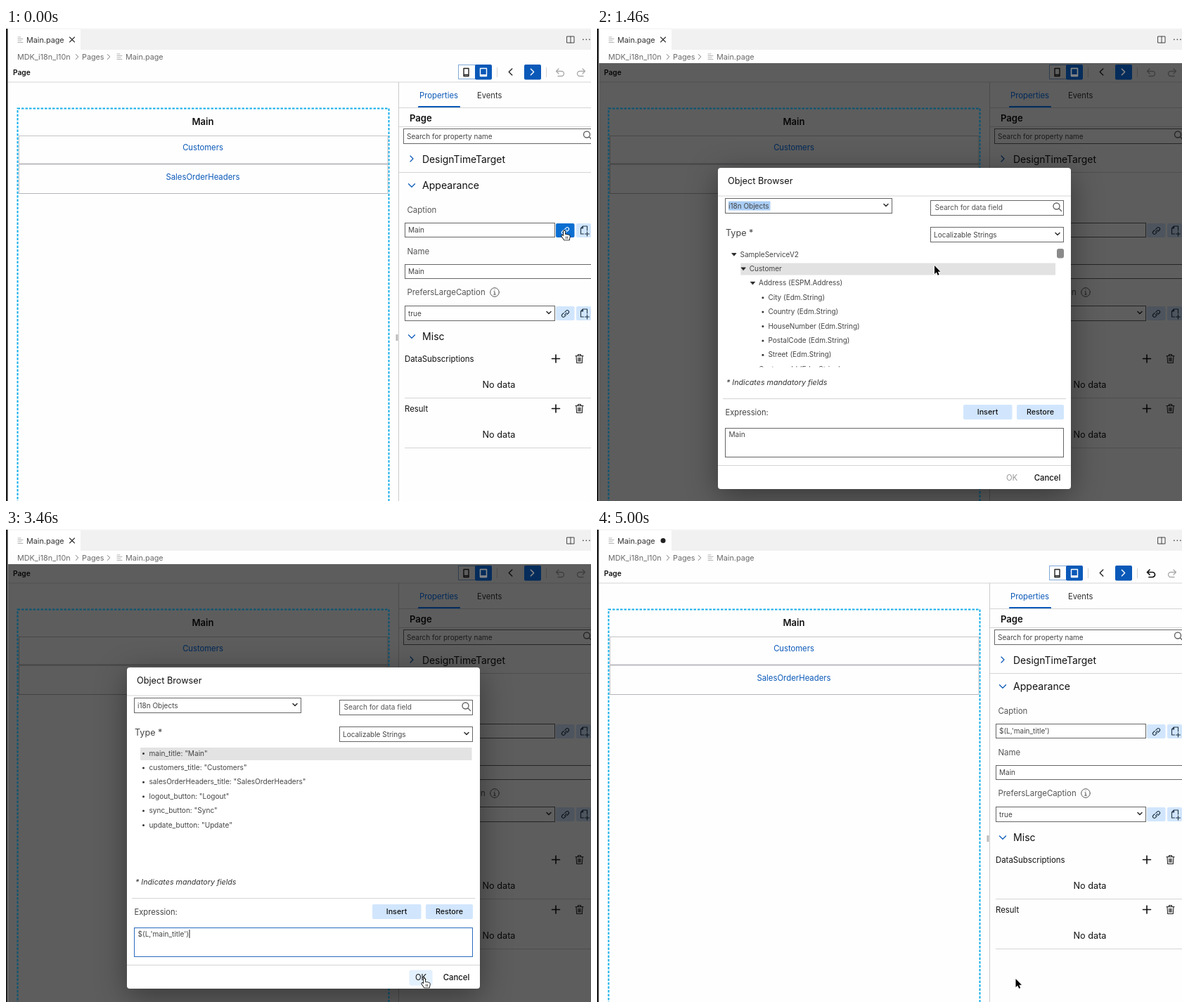
An HTML page with a canvas for the animation above (5.1 s loop, 832 by 673 pixels).

```html
<!DOCTYPE html>
<html lang="en">
<head>
<meta charset="utf-8">
<title>Object Browser</title>
<style>
  html, body { margin: 0; width: 100%; height: 100%; overflow: hidden; background: #fff; }
  canvas { display: block; width: 100%; height: 100%; }
</style>
</head>
<body>
<canvas id="stage" width="832" height="673"></canvas>
<script>
const ctx = document.getElementById('stage').getContext('2d');
const LOOP = 5100;
const BLUE = '#0a59b8', HOVER = '#0a6ed1', PALE = '#d1e6fd', INK = '#111', GREY = '#555', LINE = '#d5d5d5';
const EXPRESSION = "$(L,'main_title')";

// When each state begins, in ms
const T = { open: 200, i18n: 1130, strings: 1730, select: 2370, insert: 2740,
            overOk: 3460, press: 4000, close: 4330, done: 4600 };

// Pointer path: time, x, y
const PATH = [[0, 793, 288], [130, 793, 288], [460, 338, 228], [600, 300, 254], [850, 300, 254],
  [1060, 270, 274], [1130, 275, 274], [1460, 480, 338], [1730, 480, 340], [2230, 270, 318],
  [2740, 270, 318], [2860, 408, 431], [3000, 408, 431], [3460, 594, 639], [4500, 594, 639], [4600, 595.5, 640]];

const TREE = [[0, 'SampleServiceV2'], [1, 'Customer'], [2, 'Address (ESPM.Address)'],
  ...['City', 'Country', 'HouseNumber', 'PostalCode', 'Street'].map(n => [3, n + ' (Edm.String)']),
  [2, 'CustomerId (Edm.String)']];
const STRINGS = ['main_title: "Main"', 'customers_title: "Customers"',
  'salesOrderHeaders_title: "SalesOrderHeaders"', 'logout_button: "Logout"',
  'sync_button: "Sync"', 'update_button: "Update"'];

function text(s, x, cy, size, color = INK, style = '', align = 'left') {
  ctx.font = `${style} ${size}px Inter, "Liberation Sans", sans-serif`;
  ctx.textAlign = align;
  ctx.fillStyle = color;
  ctx.fillText(s, x, cy + size * 0.36);
}
function fill(x, y, w, h, color, radius = 0) {
  ctx.fillStyle = color;
  ctx.beginPath();
  ctx.roundRect(x, y, w, h, radius);
  ctx.fill();
}
function box(x1, y1, x2, y2, color = '#666', width = 1) {
  ctx.strokeStyle = color;
  ctx.lineWidth = width;
  ctx.strokeRect(x1 + 0.5, y1 + 0.5, x2 - x1 - 1, y2 - y1 - 1);
}
// Strokes (and optionally fills) an SVG path moved to x, y
function icon(d, x, y, color, width = 1.2, inside) {
  const path = new Path2D(d);
  ctx.save();
  ctx.translate(x, y);
  ctx.lineJoin = ctx.lineCap = 'round';
  ctx.strokeStyle = color;
  ctx.lineWidth = width;
  ctx.stroke(path);
  if (inside) { ctx.fillStyle = inside; ctx.fill(path); }
  ctx.restore();
}
const chevronRight = (x, y, color, s = 4, w) => icon(`M${-s / 2} ${-s}L${s / 2} 0L${-s / 2} ${s}`, x, y, color, w);
const chevronDown = (x, y, color, s = 4, w) => icon(`M${-s} ${-s / 2}L0 ${s / 2}L${s} ${-s / 2}`, x, y, color, w);
const magnifier = (x, y) => icon('M4.5 0a4.5 4.5 0 1 1-9 0a4.5 4.5 0 1 1 9 0M3.3 3.3L7 7', x, y, '#666', 1.4);
const fileLines = (x, y) => icon('M0-3.5H4M0-1H7M0 1.5H5M0 4H7', x, y, '#aaa', 0.9);

function field(x1, y1, x2, y2, value, select) {
  fill(x1, y1, x2 - x1, y2 - y1, '#fff');
  box(x1, y1, x2, y2);
  text(value, x1 + 5, (y1 + y2) / 2, 10, '#444');
  if (select) chevronDown(x2 - 9, (y1 + y2) / 2 - 1, '#333', 3, 1.6);
}
function bindButtons(y, hovered) {
  fill(782, y, 26.5, 20, hovered ? HOVER : PALE, 2);
  fill(811, y, 21, 20, PALE, 2);
  const ink = hovered ? '#fff' : '#223548';
  icon('M-1 1.6L1.8-1.2M-.8-2.2L1.2-4.2a2.2 2.2 0 0 1 3.2 3.2L2.4 1M.8 2.2L-1.2 4.2a2.2 2.2 0 0 1-3.2-3.2L-2.4-1', 795.5, y + 10.5, ink, 1.1);
  icon('M-1 5H-5V-3L-2-6H4V0M-5-3H-2V-6M4 2V8M1 5H7', 822.5, y + 10, '#223548', 1.1);
}

function editorBar(t) {
  fill(0, 0, 832, 31, '#f1f1f1');
  fill(0, 0, 832, 1.5, '#fafafa');
  fill(3, 2, 103, 30, '#fff');
  if (t >= T.open && t < T.done) fill(3, 31, 829, 19, '#fefefe');
  fileLines(17, 16.5);
  text('Main.page', 29, 17, 10.8, '#333');
  if (t >= T.done) fill(90.5, 13, 7, 7, '#222', 4);
  else icon('M-3.5-3.5L3.5 3.5M3.5-3.5L-3.5 3.5', 94, 16.5, '#333', 1.1);
  icon('M0 0H10V9H0ZM5 0V9', 798, 12, '#444', 1);
  for (const x of [820, 824.5, 829]) fill(x, 15.5, 1.7, 1.7, '#444', 1);
  text('MDK_i18n_l10n', 16, 41, 10.8, '#6a6a6a');
  chevronRight(101, 41, '#777', 3.5, 1);
  text('Pages', 108, 41, 10.8, '#6a6a6a');
  chevronRight(146, 41, '#777', 3.5, 1);
  fileLines(158, 40.5);
  text('Main.page', 170, 41, 10.8, '#6a6a6a');
}

// Blue parts of the page; they stay a little stronger than the rest under the shade
function accents() {
  ctx.setLineDash([3.5, 2]);
  box(16, 114, 545, 690, '#14aeea', 2);
  ctx.setLineDash([]);
  text('Customers', 280, 170, 11.25, BLUE, '', 'center');
  text('SalesOrderHeaders', 280, 211.5, 11.35, BLUE, '', 'center');
  fill(667, 52, 24, 21.5, BLUE, 2);
  fill(737, 52, 24, 21.5, BLUE, 2);
  text('Properties', 588, 96, 11.3, BLUE);
  fill(586, 111, 60, 3, BLUE, 1);
}
function accentIcons(color) {
  icon('M-4.5-5.5H4.5V5.5H-4.5ZM-4.5 3.8H4.5', 679, 63, color, 1.4);
  chevronRight(748.5, 62.5, color, 4.3, 1.3);
}

function page(t) {
  text('Page', 10, 63, 10.2, INK, '600');
  box(643, 52, 690, 73, '#7fa9d8');
  accents();
  accentIcons('#fff');
  icon('M-3.5-5.5H3.5V5.5H-3.5ZM-3.5 3.5H3.5', 654.5, 63, '#222', 1.4);
  fill(698, 56, 1, 14, LINE);
  fill(768, 56, 1, 14, LINE);
  icon('M2.3-4.5L-2.3 0L2.3 4.5', 717.5, 62.5, '#222', 1.3);
  const back = t >= T.done ? '#111' : '#aaa';
  icon('M-2-6L-5.5-2.5L-2 1M-5.5-2.5H2a3.5 3.5 0 0 1 0 7H-3', 788, 64, back, t >= T.done ? 1.7 : 1.3);
  icon('M2-6L5.5-2.5L2 1M5.5-2.5H-2a3.5 3.5 0 0 0 0 7H3', 818, 64, '#aaa', 1.3);
  fill(3, 76.5, 829, 1, LINE);
  fill(558, 77, 1, 596, '#ccc');
  fill(554.5, 436, 3, 9, '#bbb');

  text('Main', 280, 133, 13.1, INK, '600', 'center');
  fill(18, 153, 525, 1, '#c4c4c8');
  fill(18, 192.5, 525, 2, '#bcbcc2');
  fill(18, 235, 525, 1, '#b4b4ba');
  for (const x of [18, 542.5]) fill(x, 153, 1, 82, '#c4c4c8');

  text('Events', 670, 96, 11.2, '#333');
  fill(559, 113, 273, 1, LINE);
  text('Page', 574, 128, 13.1, INK, '600');
  fill(559, 140, 273, 1, LINE);
  field(565, 143, 840, 165, 'Search for property name');
  magnifier(826, 151.5);
  chevronRight(577, 186, BLUE, 4);
  text('DesignTimeTarget', 592, 186.5, 13.9);
  fill(559, 205, 273, 1, LINE);
  chevronDown(577, 224, BLUE, 4.5);
  text('Appearance', 592, 224, 14.1);
  text('Caption', 570.5, 259, 11.4, GREY);
  field(567, 277, 781, 298, t >= T.close ? EXPRESSION : 'Main');
  bindButtons(278, t < 130);
  text('Name', 570.5, 317.5, 11.4, GREY);
  field(567, 336, 840, 357, 'Main');
  text('PrefersLargeCaption', 570.5, 376, 11.4, GREY);
  icon('M6.3 0a6.3 6.3 0 1 1-12.6 0a6.3 6.3 0 1 1 12.6 0M-1-1H0V3M-1.3 3H1.3M0-3.3V-3.2', 695, 376, '#555', 1);
  field(567, 395, 781, 417, 'true', true);
  bindButtons(396, false);
  chevronDown(577, 439, BLUE, 4.5);
  text('Misc', 592, 439, 14.1);
  for (const [label, y, rule] of [['DataSubscriptions', 470.5, 526], ['Result', 541.5, 597]]) {
    text(label, 567, y, 11.4);
    icon('M-5.5 0H5.5M0-5.5V5.5', 782, y, '#111', 1.6);
    icon('M-5.5-4H5.5M-2-4V-6H2V-4M-4.5-4L-3.8 6H3.8L4.5-4M-1.7-1.5V3.7M0-1.5V3.7M1.7-1.5V3.7', 815.5, y, '#222', 1.1);
    text('No data', 701, y + 36.5, 12.7, INK, '', 'center');
    fill(567, rule, 265, 1, LINE);
  }
}

function treeRows(top, first, clipBottom, pointer) {
  ctx.save();
  ctx.beginPath();
  ctx.rect(180, top + first - 10, 474, clipBottom - first + 10);
  ctx.clip();
  TREE.forEach(([level, label], i) => {
    const y = top + first + i * 20.4, x = 203.5 + level * 13.3;
    if (level < 3 && pointer.x > x - 13 && pointer.x < 652 && Math.abs(pointer.y - y) < 9)
      fill(x - 12.5, y - 8, 664.5 - x, 17, '#e2e2e2');
    if (level === 3) fill(x - 9, y - 1, 3, 3, '#333', 2);
    else if (i < 3) icon('M-3-1.5H3L0 2Z', x - 8.5, y, '#222', 0.8, '#222');
    text(label, x, y, 10, '#444');
  });
  ctx.restore();
  fill(654, top + first - 8, 10, 13.5, '#8a8a8a', 3);
}

function stringRows(top, t, pointer) {
  STRINGS.forEach((label, i) => {
    const y = top + 122 + i * 20.4;
    const hovered = t < T.insert && pointer.x > 191 && pointer.x < 662 && Math.abs(pointer.y - y) < 9;
    const chosen = i === 0 && t >= T.select;
    if (hovered || chosen) fill(191, y - 8, 471.5, 18, t >= T.press ? '#f5f5f5' : '#e3e3e3');
    fill(194, y - 1, 3, 3, '#333', 2);
    text(label, 203.5, y, 10.1, '#444');
  });
}

function dialog(t, pointer) {
  const i18n = t >= T.i18n, strings = t >= T.strings, inserted = t >= T.insert;
  const top = strings ? 197 : 199, low = top + (i18n ? 4 : 0);
  ctx.save();
  ctx.shadowColor = 'rgba(0,0,0,.4)';
  ctx.shadowBlur = 44;
  ctx.shadowOffsetY = 10;
  fill(172, top, 502, i18n ? 457 : 453, '#fff', 4);
  ctx.restore();
  text('Object Browser', 186, top + 18.7, 12.7);
  fill(172, top + 39.5, 502, 1, LINE);

  field(182, top + 43, 420, top + 65, i18n ? 'i18n Objects' : 'OData Objects', true);
  if (i18n && !strings) {
    fill(187, top + 47.5, 59.5, 13, '#a9cdf5');
    text('i18n Objects', 187, top + 54, 10, '#444');
  }
  field(474, top + 46, 664, top + 68, '');
  text('Search for data field', 480.5, top + 56.7, 10.05, '#555');
  magnifier(653.5, top + 54.5);

  if (i18n) {
    text('Type *', 183, top + 92.3, 12.6, '#444');
    field(474, top + 84, 664, top + 106, 'Localizable Strings', true);
    text('* Indicates mandatory fields', 184, top + 305.5, 10.7, '#333', 'italic');
  } else {
    text('Format:', 182.5, top + 267, 12.4, '#444');
    field(242, top + 255, 358, top + 277, 'Binding', true);
    text('Double-click tree node to add it.', 183, top + 301.5, 10.7, '#333', 'italic');
  }
  if (strings) stringRows(top, t, pointer);
  else treeRows(top, i18n ? 123 : 81, i18n ? 283.5 : 241.5, pointer);

  fill(179, low + 324, 488, 1, LINE);
  text('Expression:', 182.5, low + 344, 11.2, '#444');
  fill(521, low + 333, 69.5, 21, PALE, 2);
  fill(597, low + 333, 67, 21, PALE, 2);
  text('Insert', 555.5, low + 343.5, 10.8, INK, '500', 'center');
  text('Restore', 630.5, low + 343.5, 10.7, INK, '500', 'center');

  const focused = inserted && t < T.press;
  box(182, low + 366, 664, low + 408, focused ? '#2a6bbf' : '#666');
  text(inserted ? EXPRESSION : 'Main', 187.5, low + 375, 10.1, '#444');
  if (focused) fill(188 + ctx.measureText(EXPRESSION).width, low + 369, 1, 12, '#222');

  fill(172, low + 419, 502, 1, LINE);
  const over = t >= T.overOk, pressed = t >= T.press;
  if (over) fill(573.5, low + 426.5, 33, 22, pressed ? HOVER : '#e3f0fd', 2);
  if (pressed) box(575, low + 428, 605, low + 447, '#cfe4fa');
  text('OK', 590, low + 437, 11.3, pressed ? '#fff' : inserted ? INK : '#999', '', 'center');
  text('Cancel', 640.5, low + 437, 11.3, INK, '500', 'center');
}

function pointerAt(t) {
  const i = PATH.findIndex(p => p[0] > t);
  if (i < 0) { const [, x, y] = PATH[PATH.length - 1]; return { x, y }; }
  const [t0, x0, y0] = PATH[i - 1], [t1, x1, y1] = PATH[i];
  const u = (t - t0) / (t1 - t0), k = u * u * (3 - 2 * u);
  return { x: x0 + (x1 - x0) * k, y: y0 + (y1 - y0) * k };
}
function drawPointer({ x, y }, hand) {
  if (hand) {
    icon('M0 1c0-1.5 2-1.5 2 0v4l5 1c1.5.4 2 1 1.8 2.5l-.8 4.5H1l-3.5-5c-.8-1.3.5-2 1.5-1.2L0 8z', x, y + 0.5, '#000', 1.6, '#fff');
    icon('M3.5 8.5V11M5.5 8.5V11', x, y + 0.5, '#000', 0.7);
  } else {
    icon('M0 0v12l2.8-2.5 1.9 4.3 2-.9-1.9-4.2H8.5z', x, y, '#fff', 1.6, '#000');
  }
}

function draw(t) {
  const pointer = pointerAt(t);
  fill(0, 0, 832, 673, '#fefefe');
  page(t);
  if (t >= T.open && t < T.done) {
    fill(3, 50, 829, 623, 'rgba(0,0,0,.63)');
    ctx.globalAlpha = 0.2;
    accents();
    ctx.globalAlpha = 1;
    accentIcons('#888');
  }
  editorBar(t);
  fill(0, 1, 2.5, 672, '#1c1c1c');
  if (t >= T.open && t < T.close) dialog(t, pointer);
  drawPointer(pointer, t < T.open || (t >= T.overOk && t < T.done));
}

const start = performance.now();
function tick() {
  draw((performance.now() - start) % LOOP);
  requestAnimationFrame(tick);
}
tick();
</script>
</body>
</html>
```
